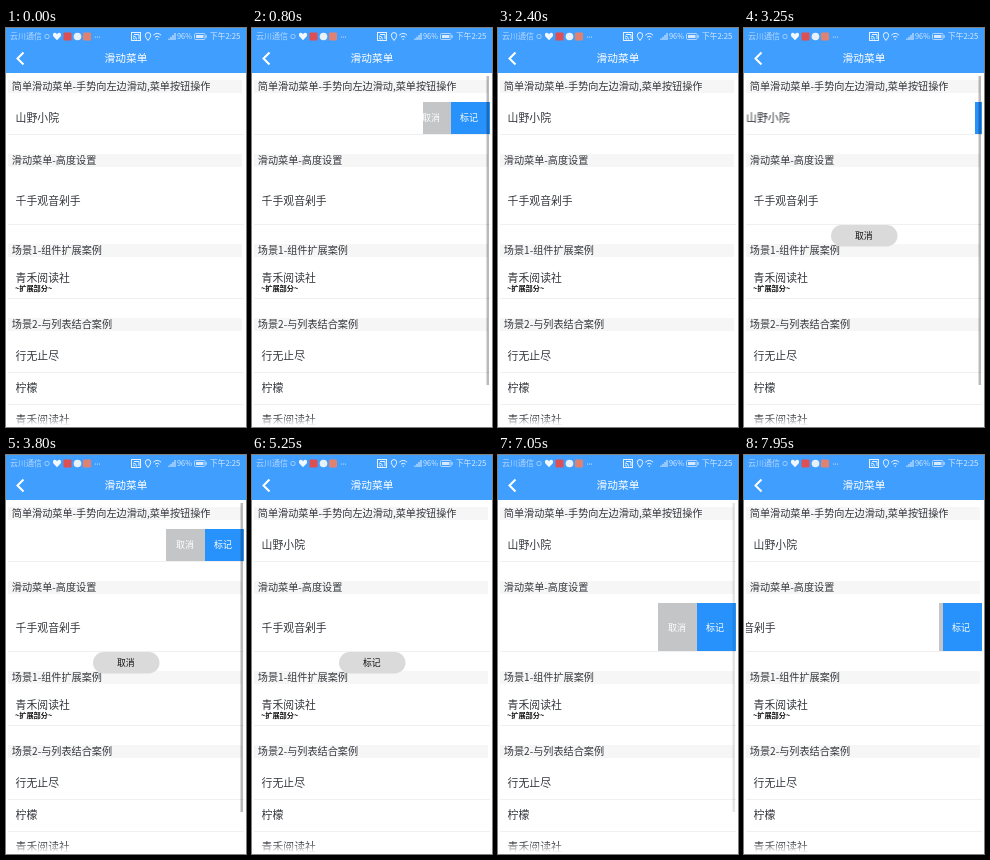
An HTML page that plays this animation: 240x399 px, repeating every 8 s.

```html
<!DOCTYPE html>
<html lang="zh-CN">
<head>
<meta charset="utf-8">
<title>滑动菜单</title>
<style>
html, body { margin: 0; width: 100%; height: 100%; overflow: hidden; background: #fff; }
svg { display: block; width: 100vw; height: 100vh; }
text { font-family: "Noto Sans CJK SC", "Noto Sans CJK", "Noto Sans", sans-serif; fill: #34373d; }
.status text { font-size: 7.7px; fill: #d6e9ff; }
.status .carrier { font-size: 8px; fill: #b5d7ff; }
.title { font-size: 10.7px; font-weight: 500; fill: #fff; }
.head { font-size: 10.15px; }
.cell { font-size: 10.85px; }
.note { font-size: 7.2px; font-weight: 700; fill: #111; }
.btn { font-size: 9px; fill: #fff; text-anchor: middle; }
.toast text { font-size: 8.8px; font-weight: 500; fill: #111; text-anchor: middle; }
.bar { fill: #f6f6f6; }
.line { fill: #f0f0f1; }

.row1, .row2, .scroll, .toast, .cancel, .mark { animation: 8s linear infinite; }
.row1 { animation-name: row1; }
.row2 { animation-name: row2; }
.scroll { animation-name: scroll; }
.toast { animation-name: toast; }
.cancel { animation-name: cancel; }
.mark { animation-name: mark; }

@keyframes row1 {
  0%, .6% { transform: translateX(0); animation-timing-function: cubic-bezier(.4, 0, .75, .9); }
  10% { transform: translateX(-67px); animation-timing-function: ease-out; }
  13.125%, 21.25% { transform: translateX(-78px); animation-timing-function: ease-in-out; }
  30%, 38.75% { transform: translateX(0); animation-timing-function: ease-in-out; }
  47.5%, 57.5% { transform: translateX(-78px); animation-timing-function: ease-in-out; }
  65%, 100% { transform: translateX(0); }
}
@keyframes row2 {
  0%, 72.5% { transform: translateX(0); animation-timing-function: ease-in; }
  78.125% { transform: translateX(-27px); animation-timing-function: ease-out; }
  81.25% { transform: translateX(-76px); }
  83.75%, 94.375% { transform: translateX(-78px); animation-timing-function: cubic-bezier(.42, 0, .8, .8); }
  99.375%, 100% { transform: translateX(-43px); }
}
@keyframes scroll {
  0%, .62% { opacity: 0; }
  .625%, 11.25% { opacity: 1; }
  18.75%, 39.37% { opacity: 0; }
  39.375%, 49.375% { opacity: 1; }
  55%, 73.12% { opacity: 0; }
  73.125%, 83.125% { opacity: 1; }
  91.25%, 100% { opacity: 0; }
}
@keyframes toast {
  0%, 33.125% { opacity: 0; }
  37.5%, 66.875% { opacity: 1; }
  70.625%, 100% { opacity: 0; }
}
@keyframes cancel {
  0%, 64.37% { opacity: 1; }
  64.375%, 100% { opacity: 0; }
}
@keyframes mark {
  0%, 64.37% { opacity: 0; }
  64.375%, 100% { opacity: 1; }
}
</style>
</head>
<body>
<svg viewBox="0 0 240 399" preserveAspectRatio="none">
  <defs>
    <clipPath id="clip1"><rect x="2" y="74" width="236" height="32"/></clipPath>
    <clipPath id="clip2"><rect x="2" y="148" width="236" height="48"/></clipPath>
    <linearGradient id="fade" x1="0" y1="0" x2="0" y2="1">
      <stop offset="0" stop-color="#fff" stop-opacity="0"/>
      <stop offset=".85" stop-color="#fff"/>
    </linearGradient>
  </defs>
  <rect width="240" height="399" fill="#fff"/>

  <!-- header -->
  <rect width="240" height="45" fill="#409eff"/>
  <g class="status">
    <text class="carrier" x="4" y="11.300">云川通信</text>
    <circle cx="41" cy="8.500" r="2.200" fill="none" stroke="#b5d7ff" stroke-width=".8"/>
    <path d="M51 12.300L47.200 8.300Q46.200 4.800 49 4.800Q50.400 4.900 51 6.300Q51.600 4.900 53 4.800Q55.800 4.800 54.800 8.300Z" fill="#f2f8ff"/>
    <rect x="57.500" y="4.500" width="8" height="8" rx="1" fill="#dd4f52"/>
    <circle cx="71.500" cy="8.500" r="3.800" fill="#e8f0f8"/>
    <rect x="77" y="4.500" width="8" height="8" rx="1" fill="#e08272"/>
    <g fill="#d6e9ff">
      <circle cx="89.500" cy="9" r=".6"/><circle cx="91.500" cy="9" r=".6"/><circle cx="93.500" cy="9" r=".6"/>
    </g>
    <g fill="none" stroke="#e6f2ff" stroke-width="1">
      <rect x="125.500" y="4.500" width="9" height="8"/>
      <path d="M127 8A3.500 3.500 0 0 1 130.500 11.500M127 10A1.500 1.500 0 0 1 128.500 11.500M128 6.500H133V11"/>
      <path d="M142 12.500Q139.300 9.200 139.300 7.300A2.700 2.700 0 0 1 144.700 7.300Q144.700 9.200 142 12.500Z"/>
      <path d="M147.300 7.200Q151.200 3.600 155.100 7.200M149 9.200Q151.200 7.200 153.400 9.200M151.200 10.500V12"/>
      <path d="M163 12V10.500M165 12V8.800M167 12V7M169 12V5"/>
      <rect x="188.500" y="5.500" width="10.500" height="6" rx="1" stroke="#b5d7ff"/>
    </g>
    <rect x="190" y="7" width="7.500" height="3" fill="#d6e9ff"/>
    <rect x="199.500" y="7.200" width="1.300" height="2.600" fill="#b5d7ff"/>
    <text x="171" y="11.200" style="font-size:7.400px">96%</text>
    <text x="204" y="11.300">下午2:25</text>
  </g>
  <path d="M17.500 24.500L11.500 30.500L17.500 36.500" fill="none" stroke="#fff" stroke-width="2"/>
  <text class="title" x="98.600" y="34.200">滑动菜单</text>

  <!-- section headings -->
  <g class="bar">
    <rect x="2" y="52" width="234" height="13"/>
    <rect x="2" y="126" width="234" height="13"/>
    <rect x="2" y="216" width="234" height="13"/>
    <rect x="2" y="290" width="234" height="13"/>
  </g>
  <g class="head">
    <text x="5.800" y="61.800">简单滑动菜单-手势向左边滑动,菜单按钮操作</text>
    <text x="5.800" y="135.800">滑动菜单-高度设置</text>
    <text x="5.800" y="225.800">场景1-组件扩展案例</text>
    <text x="5.800" y="299.800">场景2-与列表结合案例</text>
  </g>

  <!-- swipe rows: fixed buttons under a sliding cell -->
  <g clip-path="url(#clip1)">
    <rect x="160" y="74" width="39" height="32" fill="#c3c5c7"/>
    <rect x="199" y="74" width="39" height="32" fill="#2792fb"/>
    <text class="btn" x="179" y="93.400">取消</text>
    <text class="btn" x="217" y="93.400">标记</text>
    <g class="row1">
      <rect x="2" y="74" width="236" height="32" fill="#fff"/>
      <text class="cell" x="9.600" y="94.200">山野小院</text>
    </g>
  </g>
  <g clip-path="url(#clip2)">
    <rect x="160" y="148" width="39" height="48" fill="#c3c5c7"/>
    <rect x="199" y="148" width="39" height="48" fill="#2792fb"/>
    <text class="btn" x="179" y="175.700">取消</text>
    <text class="btn" x="217" y="175.700">标记</text>
    <g class="row2">
      <rect x="2" y="148" width="236" height="48" fill="#fff"/>
      <text class="cell" x="9.600" y="176.500">千手观音剁手</text>
    </g>
  </g>

  <!-- plain rows -->
  <g class="line">
    <rect x="2" y="106" width="236" height="1"/>
    <rect x="2" y="196" width="236" height="1"/>
    <rect x="2" y="270" width="236" height="1"/>
    <rect x="2" y="344" width="236" height="1"/>
    <rect x="2" y="376" width="236" height="1"/>
  </g>
  <g class="cell">
    <text x="9.600" y="253.700">青禾阅读社</text>
    <text x="9.600" y="332.200">行无止尽</text>
    <text x="9.600" y="364.200">柠檬</text>
    <text x="9.600" y="396.200">青禾阅读社</text>
  </g>
  <text class="note" x="9" y="263">~扩展部分~</text>
  <rect y="388" width="240" height="11" fill="url(#fade)"/>

  <rect class="scroll" x="234.500" y="48" width="2.500" height="309" fill="#000" fill-opacity=".27"/>

  <g class="toast">
    <rect x="87" y="197" width="66.500" height="21.500" rx="10.700" fill="#dadada"/>
    <text class="cancel" x="119.800" y="211.200">取消</text>
    <text class="mark" x="119.800" y="211.200">标记</text>
  </g>
</svg>
</body>
</html>
```
